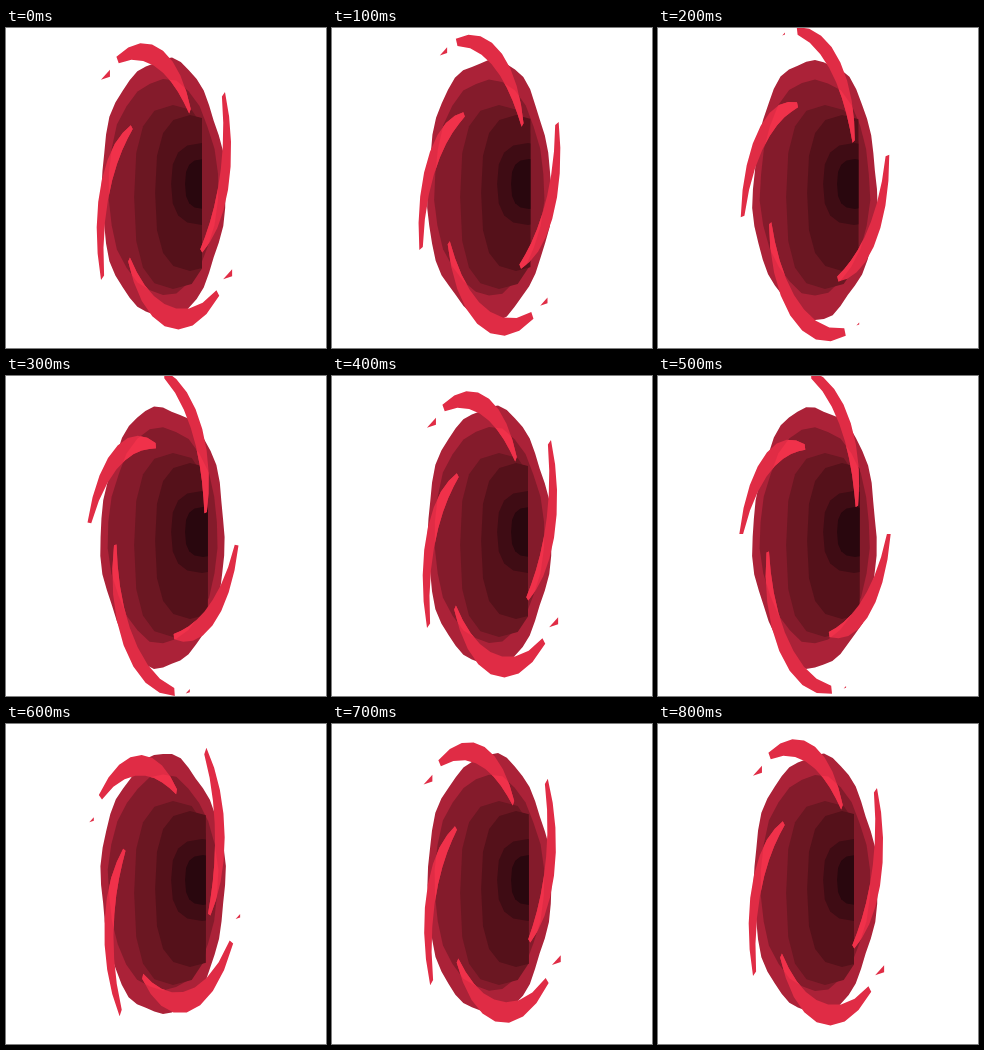
An HTML page with a canvas that plays this animation: 320x320 px, repeating every 900 ms.

```html
<!DOCTYPE html>
<html lang="en">
<head>
<meta charset="utf-8">
<title>Red portal</title>
<style>
  html, body { margin: 0; width: 100%; height: 100%; overflow: hidden; background: #fff; }
  canvas { display: block; width: 320px; height: 320px; }
</style>
</head>
<body>
<canvas id="stage" width="320" height="320"></canvas>
<script>
const ctx = document.getElementById('stage').getContext('2d');
const STEP_MS = 100;
const radians = degrees => degrees * Math.PI / 180;

// Turn of the flames in each step, in degrees; a quarter turn looks like none.
const turns = [0, 12, 24, 39, 0, 35, -20, -4, 0];

// Each flame spirals inwards, clockwise from the top.
const flames = [
  { from: -38, to: 38, tip: 0.73, spark: true },
  { from: 55, to: 128, tip: 0.81 },
  { from: 132, to: 225, tip: 0.8, spark: true },
  { from: 235, to: 311, tip: 0.69 }
];

const depths = [
  { color: '#6b1722', x: 167, y: 169, rx: 39, ry: 92 },
  { color: '#55111a', x: 184, y: 165, rx: 35, ry: 78 },
  { color: '#3f0c14', x: 196, y: 156, rx: 31, ry: 41 },
  { color: '#29070e', x: 197, y: 156, rx: 18, ry: 25 }
];

function polygon(points) {
  const path = new Path2D();
  points.forEach(([x, y]) => path.lineTo(x, y));
  path.closePath();
  return path;
}

const series = (count, make) => Array.from({ length: count }, (_, i) => make(i));

// Oval with a squareness exponent (2 is an ellipse) and an uneven edge.
function oval({ x, y, rx, ry }, power, sides, rough, phase = 0) {
  const bend = v => Math.sign(v) * Math.abs(v) ** (2 / power);
  return polygon(series(sides, i => {
    const a = i / sides * 2 * Math.PI;
    const r = 1 + rough * (Math.sin(5 * a - phase) + 0.6 * Math.sin(11 * a + phase));
    return [x + rx * r * bend(Math.sin(a)), y - ry * r * bend(Math.cos(a))];
  }));
}

function orbit(degrees, r) {
  const a = radians(degrees);
  return [157 + 60 * r * Math.sin(a), 158 - 130 * r * Math.cos(a)];
}

function flamePath({ from, to, tip }, turn) {
  const count = 9;
  const edge = side => series(count, i => {
    const u = i / (count - 1);
    const r = tip + (1.23 - tip) * (1 - u) ** 1.15;
    const half = 0.085 * Math.sin(Math.PI * (0.12 + 0.8 * u));
    return orbit(turn + from + (to - from) * u, r + side * half);
  });
  return polygon([...edge(1), ...edge(-1).reverse()]);
}

function sparkPath({ from }, turn) {
  const [x, y] = orbit(turn + from - 10, 1.28);
  const size = 5 * Math.abs(Math.cos(radians(3 * turn)));
  return polygon([[x - size, y + size], [x + size * 0.8, y - size], [x + size * 0.8, y + size * 0.4]]);
}

function fill(path, color) {
  ctx.fillStyle = color;
  ctx.fill(path);
}

function clipped(path, paint) {
  ctx.save();
  ctx.clip(path);
  paint();
  ctx.restore();
}

function draw(turn) {
  const phase = radians(turn * 4);
  const rim = oval({ x: 157, y: 161, rx: 62, ry: 130 }, 2, 44, 0.018, phase);
  const wall = oval({ x: 157, y: 159, rx: 55, ry: 108 }, 2, 26, 0.012, phase);
  const opening = new Path2D();
  opening.rect(0, 0, 196 + 6 * Math.abs(Math.sin(radians(2 * turn))), 320);
  const arms = flames.map(flame => flamePath(flame, turn));

  ctx.clearRect(0, 0, 320, 320);
  fill(rim, '#ab2238');
  fill(wall, '#841b2b');
  clipped(opening, () =>
    depths.forEach(depth => fill(oval(depth, 2.6, 16, 0.01), depth.color)));
  arms.forEach(arm => fill(arm, '#e02c45'));
  clipped(wall, () => arms.forEach(arm => fill(arm, '#f0314a')));
  flames.filter(flame => flame.spark)
    .forEach(flame => fill(sparkPath(flame, turn), '#e02c45'));
}

function tick() {
  const step = Math.floor(performance.now() / STEP_MS) % turns.length;
  draw(turns[step]);
  requestAnimationFrame(tick);
}
tick();
</script>
</body>
</html>
```
